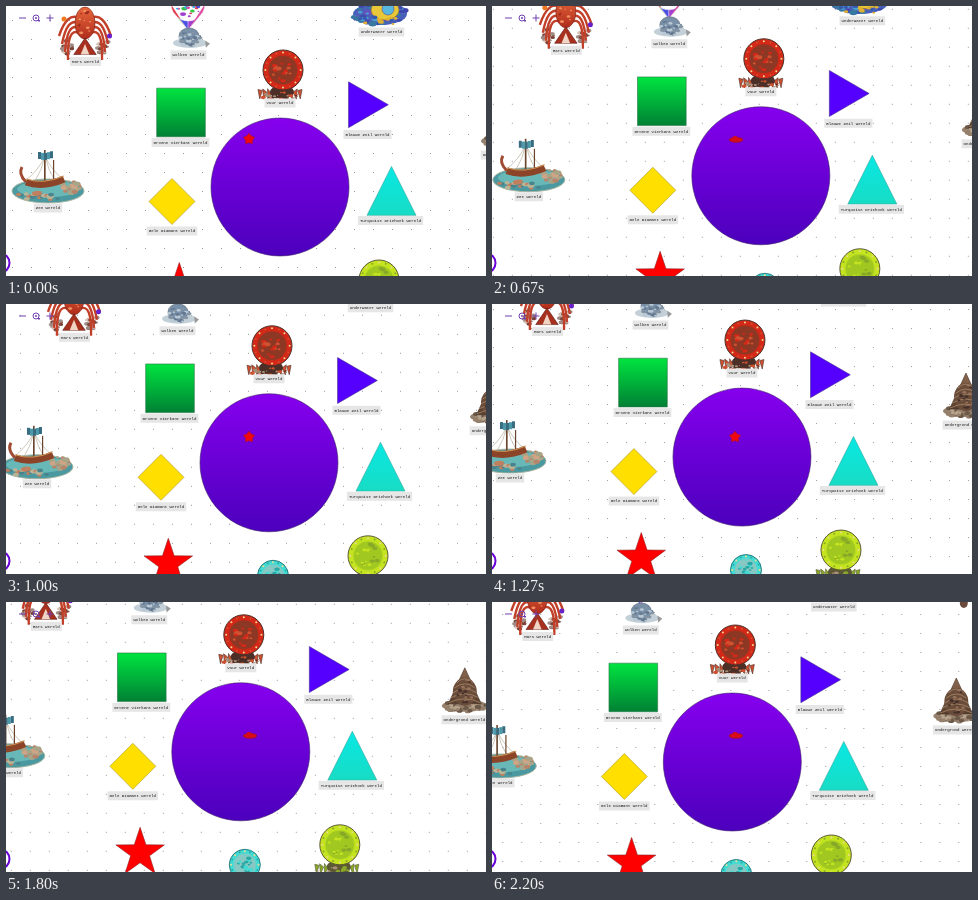
Recreate the animation shown at these times as an HTML page with a canvas. Size 480 by 270 pixels, loop 2270 ms.

```html
<!DOCTYPE html>
<html lang="nl">
<head>
<meta charset="utf-8">
<title>Werelden</title>
<style>
html, body { margin: 0; width: 100%; height: 100%; overflow: hidden; background: #fff; }
canvas { display: block; width: 480px; height: 270px; }
</style>
</head>
<body>
<canvas id="stage" width="480" height="270"></canvas>
<script>
const ctx = document.getElementById('stage').getContext('2d');
const LOOP = 2270, STEP = 200 / 3, GAP = 19, TURN = 2 * Math.PI;

// Camera path: time, x, y
const path = [
  [0, 0, 0], [670, -5.2, -11.3], [1000, -11, -22.2], [1270, -24.2, -28],
  [1530, -37.5, -33], [1800, -39.2, -31.2], [2200, -33.7, -21], [2270, -32.7, -19]
];

function slope(i, k) {
  const a = path[Math.max(0, i - 1)], b = path[Math.min(path.length - 1, i + 1)];
  return (b[k] - a[k]) / (b[0] - a[0]);
}

function camera(t) {
  let i = 0;
  while (i < path.length - 2 && t >= path[i + 1][0]) i++;
  const a = path[i], b = path[i + 1], d = b[0] - a[0], u = (t - a[0]) / d;
  return [1, 2].map(k =>
    a[k] * (1 + 2 * u) * (1 - u) ** 2 + slope(i, k) * d * u * (1 - u) ** 2 +
    b[k] * u * u * (3 - 2 * u) + slope(i + 1, k) * d * u * u * (u - 1));
}

function randomizer(seed) {
  return () => (seed = seed * 16807 % 2147483647) / 2147483647;
}

function paint(fill, line, width = 0.6) {
  if (fill) { ctx.fillStyle = fill; ctx.fill(); }
  if (line) { ctx.strokeStyle = line; ctx.lineWidth = width; ctx.stroke(); }
}

function oval(x, y, rx, ry, fill, line, width) {
  ctx.beginPath();
  ctx.ellipse(x, y, rx, ry, 0, 0, TURN);
  paint(fill, line, width);
}

function rect(x, y, w, h, fill) {
  ctx.fillStyle = fill;
  ctx.fillRect(x, y, w, h);
}

// Regular polygon, or a star when inner is given; turn is in full turns
function shape(n, x, y, rx, ry, fill, line, turn = 0, inner = 0) {
  const count = inner ? 2 * n : n;
  ctx.beginPath();
  for (let i = 0; i < count; i++) {
    const a = (i / count + turn) * TURN, q = inner && i % 2 ? inner : 1;
    ctx.lineTo(x + q * rx * Math.sin(a), y - q * ry * Math.cos(a));
  }
  ctx.closePath();
  paint(fill, line);
}

function curve(x, y, cx, cy, dx, dy, color, width) {
  ctx.beginPath();
  ctx.moveTo(x, y);
  ctx.quadraticCurveTo(x + cx, y + cy, x + dx, y + dy);
  paint(null, color, width);
}

// Random spots inside an oval
function scatter(n, x, y, rx, ry, size, colors) {
  const random = randomizer(n * 977 + Math.round(x * 31));
  for (let i = 0; i < n; i++) {
    const a = random() * TURN, d = Math.sqrt(random()), s = size * (0.5 + random());
    oval(x + rx * d * Math.cos(a), y + ry * d * Math.sin(a), s, s * 0.65, colors[i % colors.length]);
  }
}

function shade(top, bottom, from, to) {
  const g = ctx.createLinearGradient(0, top, 0, bottom);
  g.addColorStop(0, from);
  g.addColorStop(1, to);
  return g;
}

function label(name, x, y) {
  const text = name + ' Wereld', w = text.length * 2.45 + 4;
  rect(x - w / 2, y - 4.5, w, 9, '#e6e6e6');
  ctx.save();
  ctx.translate(x, y + 0.2);
  ctx.scale(0.1, 0.1);
  ctx.fillStyle = '#111';
  ctx.font = '40.8px "Liberation Mono", monospace';
  ctx.textAlign = 'center';
  ctx.textBaseline = 'middle';
  ctx.fillText(text, 0, 0);
  ctx.restore();
}

function mars() {
  for (const s of [-1, 1]) {
    scatter(24, 79 + s * 18, 40, 6, 8, 2, ['#a08c86', '#d8c4b8', '#7a4438']);
    for (let i = 0; i < 4; i++) {
      curve(79 + s * 6, 12 + i * 5, s * 12, -6, s * (20 - i * 3), 18 + i * 3, '#c2402a', 2.4);
    }
  }
  oval(79, 17, 10, 16, shade(1, 33, '#e8683c', '#b02c1c'), '#742015');
  scatter(14, 79, 17, 7, 12, 1.6, ['#f09060', '#a02c1c']);
  shape(3, 79, 43, 13, 11, '#a8301f', '#5c1c14');
  shape(3, 79, 45, 5, 7, '#f0d4c4');
  oval(58, 13, 2.5, 2.5, '#f07820');
  oval(103.5, 30, 2.5, 2.5, '#6820c8');
}

function clouds() {
  const hues = ['#e33a52', '#39c54a', '#4b50e0', '#a040d0', '#30b0e0', '#e050a0'];
  hues.forEach((hue, i) => {
    ctx.beginPath();
    ctx.moveTo(182, 24);
    ctx.arc(182, -2, 17, (1 - i / 6) * TURN / 2, (1 - (i + 1) / 6) * TURN / 2, true);
    paint(hue, '#fff', 0.5);
  });
  scatter(18, 182, 3, 11, 8, 2, hues);
  oval(184, 37, 17, 5, '#c4d0d8');
  oval(183, 30, 10, 8, '#7890a8', '#5e6a78');
  scatter(30, 184, 33, 13, 7, 2, ['#b8c8d4', '#8494a4', '#647890']);
  shape(3, 201, 38, 3, 4, '#999', null, -0.1);
}

function underwater() {
  oval(374, 8, 27, 11, '#4860b8');
  scatter(70, 374, 8, 28, 11, 3, ['#4048b0', '#6a50c0', '#48a0d0', '#3878a0']);
  oval(379, 4, 14, 10, '#e8c838', '#80672a');
  oval(382, 3, 6, 6, '#58b8e0', '#604890');
  scatter(16, 374, 15, 24, 4, 2, ['#e0b030', '#3858b0']);
}

// A medal resting on a stump among leaves
function medal(x, y, r, rim, face, leaf, stump) {
  for (let i = 0; i < 10; i++) {
    const u = i / 4.5 - 1;
    shape(3, x - 3 + u * r, y + r * 1.25 - Math.abs(u) * 2, 2.5, 6, leaf, stump, u * 0.15);
  }
  oval(x - 1, y + r * 1.1, r * 0.6, r * 0.32, stump);
  scatter(24, x - 2, y + r * 1.3, r, 4, 1.8, [leaf, stump, '#a89078']);
  oval(x, y, r, r, rim, stump, 1);
  for (let i = 0; i < 16; i++) {
    const a = i / 16 * TURN;
    oval(x + r * 0.88 * Math.cos(a), y + r * 0.88 * Math.sin(a), 1, 1, i % 2 ? leaf : '#f0d890');
  }
  oval(x, y, r * 0.74, r * 0.74, face, rim);
  scatter(24, x, y, r * 0.6, r * 0.6, 2, [rim, face, leaf]);
}

function sea() {
  oval(42, 185, 36, 12, '#4a98a0', '#a8b4a0', 1);
  oval(42, 183, 31, 8, '#68b8b8');
  scatter(26, 65, 181, 10, 6, 2.6, ['#d0a484', '#a8a488', '#b88468']);
  scatter(22, 34, 190, 24, 4, 2.6, ['#c08060', '#b8b498', '#48848c']);
  for (let i = 0; i < 5; i++) {
    curve(39, 150, (i - 2) * 3, 14, (i - 2) * 10, 25, '#b8b0a0', 0.7);
  }
  rect(38, 144, 1.6, 32, '#69452f');
  rect(47, 154, 1.2, 22, '#69452f');
  for (let i = 0; i < 5; i++) {
    rect(32 + i * 3, 146 + Math.sin(i), 3, 7, i % 2 ? '#4c98a8' : '#386c80');
  }
  curve(20, 176, 17, 6, 38, -3, '#8c4428', 7);
  curve(20, 173, 17, 6, 38, -3, '#d09858', 1);
  curve(20, 176, -8, -8, -4, -15, '#a04c34', 3);
}

function underground() {
  oval(498, 135, 23, 6, '#94806c');
  scatter(50, 498, 135, 23, 6, 2.4, ['#b8a48c', '#6c5848', '#94806c']);
  shape(3, 498, 121, 19, 24, shade(97, 134, '#8c6850', '#553c2c'), '#463328');
  oval(498, 121, 12, 14, '#6a4c3a');
  for (let i = 0; i < 5; i++) {
    curve(490 - i * 2, 112 + i * 5, 8 + i * 2, -8, 16 + i * 4, 0, '#a88868', 0.8);
  }
  scatter(20, 498, 120, 9, 12, 1.5, ['#44302a', '#98745c']);
  oval(505.5, 22, 4, 5, '#6b493d');
}

const names = [
  ['Mars', 79.5, 55.5], ['Wolken', 182.5, 49], ['Underwater', 375.5, 26], ['Vuur', 274, 97],
  ['Groene Vierkant', 174.5, 136.5], ['Blauwe Zeil', 361.5, 128.5], ['Zee', 42, 202],
  ['Gele Diamant', 166, 225], ['Turquoise Driehoek', 384.5, 214.5], ['Ondergrond', 497.5, 149]
];

function world() {
  mars();
  clouds();
  underwater();
  medal(277, 64, 20, '#d42818', '#8c3824', '#d05030', '#4c3028');
  sea();
  underground();

  oval(274, 181, 69, 69, shade(112, 250, '#8600ee', '#4c00bc'), '#3b2468');
  shape(4, 175, 106.5, 34.4, 34.4, shade(82, 131, '#00e440', '#008034'), '#287345', 1 / 8);
  shape(3, 355.8, 98.7, 26.5, 26.5, '#5500ff', '#40308c', 1 / 4);
  shape(4, 166, 195.5, 23, 23, '#ffdf00', '#aa982c');
  shape(3, 385.5, 193, 28.3, 32.6, shade(160, 210, '#08e8e4', '#18dcc4'), '#36a79f');
  shape(5, 173.3, 282, 25.5, 25.5, '#ff0000', '#8d2222', 0, 0.39);

  medal(373, 274, 20, '#c4e420', '#a0c820', '#88a828', '#5c5834');
  medal(278, 294, 15.5, '#40dcd4', '#88c8c4', '#28a8a4', '#287c80');
  names.forEach(args => label(...args));
}

function dots(x, y) {
  ctx.fillStyle = '#999';
  for (let i = x % GAP - GAP; i < 480; i += GAP) {
    for (let j = y % GAP - GAP; j < 270; j += GAP) ctx.fillRect(i, j, 1, 1);
  }
}

// The player squashes down three times per 17 steps
function player(step) {
  const phase = step * 3 / 17 % 1;
  if (phase > 0.7 && phase < 0.97) {
    oval(244, 133.8, 7, 2.6, '#d80c18', '#821052');
    oval(243, 131.5, 2.5, 1.5, '#d80c18');
  } else {
    shape(5, 243, 133, 6, 6, '#f00810', '#96104c', 0, 0.63);
  }
}

function controls() {
  const ink = '#7040b0';
  rect(13, 11.5, 7, 1, ink);
  rect(40.5, 11.5, 7, 1, ink);
  rect(43.5, 8.5, 1, 7, ink);
  oval(30, 12, 3, 3, null, ink, 1);
  oval(30, 12, 1, 1, ink);
  rect(32, 14, 2, 1.5, ink);
  oval(-5.5, 257, 9, 9.5, null, '#6a00d8', 2);
}

function draw(now) {
  const t = now % LOOP, step = Math.floor((t + 4) / STEP);
  const [x, y] = camera(Math.min(LOOP, step * STEP));
  ctx.clearRect(0, 0, 480, 270);
  dots(x + 6, y + 14);
  ctx.save();
  ctx.translate(x, y);
  world();
  ctx.restore();
  player(step);
  controls();
}

const start = performance.now();
function tick() {
  draw(performance.now() - start);
  requestAnimationFrame(tick);
}
tick();
</script>
</body>
</html>
```
